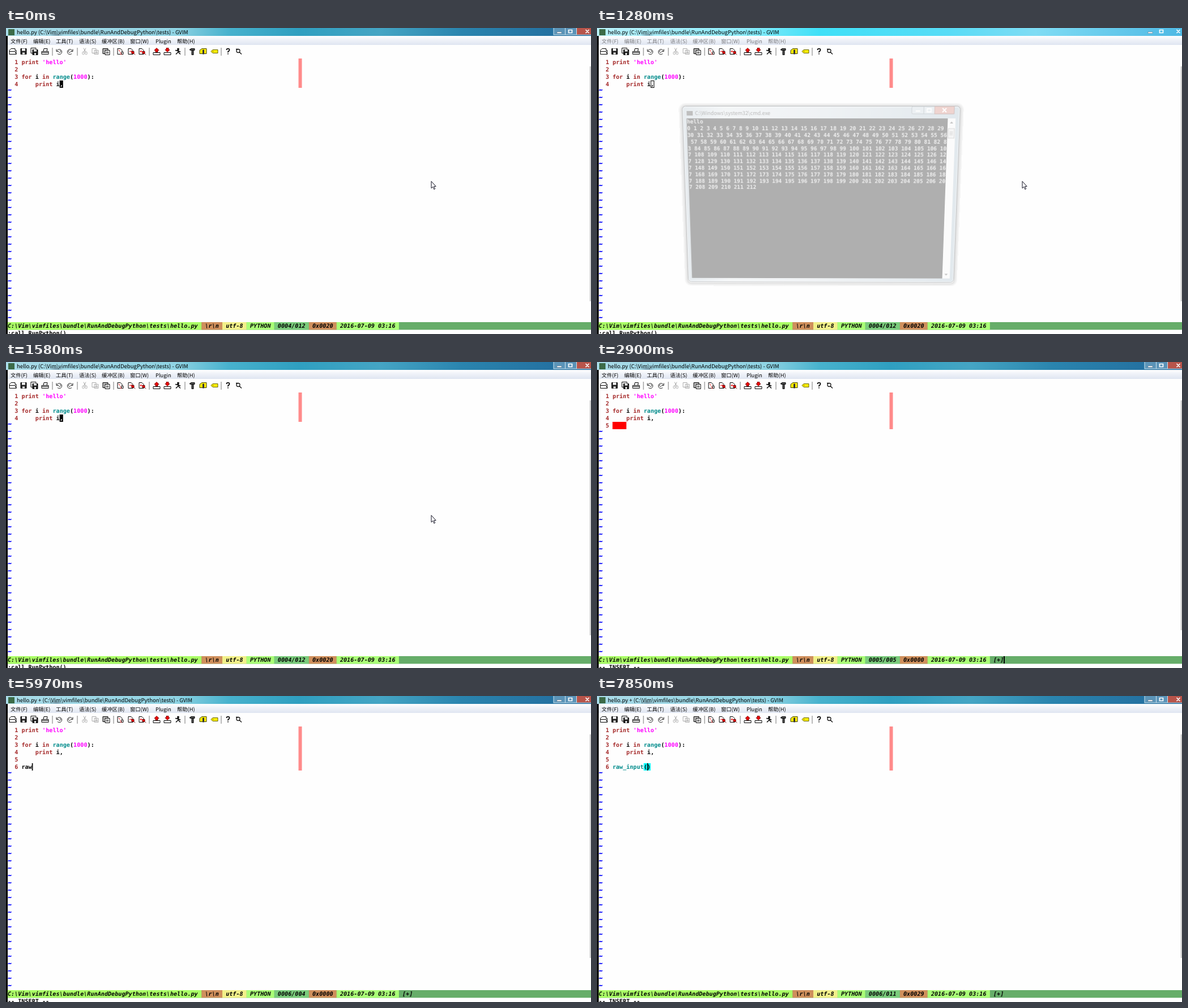
Animation, 1033 px wide and 542 px high, one loop 8 s. Source, as an HTML page:

```html
<!DOCTYPE html>
<html lang="zh">
<head>
<meta charset="utf-8">
<title>hello.py - GVIM</title>
<style>
  html, body { margin: 0; width: 100%; height: 100%; overflow: hidden; background: #fff; }
  #stage { position: relative; width: 1033px; height: 542px; overflow: hidden; }
  svg { position: absolute; left: 0; top: 0; overflow: visible; }
  text { white-space: pre; text-rendering: geometricPrecision; }
  .ui { font: 9.3px "Noto Sans CJK SC", "Noto Sans CJK", "Noto Sans", sans-serif; }
  .title { font-size: 9.6px; }
  .code { font: bold 10.156px "DejaVu Sans Mono", monospace; }
  .tilde { stroke: #00f; stroke-width: .6px; }
  .status { font-style: italic; }
  .con { font: bold 9.75px "DejaVu Sans Mono", monospace; }
  #cmd { transform-origin: 0 0; }
</style>
</head>
<body>
<div id="stage">
  <svg id="chrome" width="1033" height="542"></svg>
  <svg id="editor" width="1033" height="542"></svg>
  <svg id="cmd" width="500" height="325"></svg>
  <svg id="pointer" width="1033" height="542">
    <path d="M751 271.5v12.3l2.8-2.6 2 4.6 1.900-.9-2-4.300h3.500z" fill="#fff" stroke="#112" stroke-width="1"/>
  </svg>
</div>
<script>
const LOOP = 8000, CW = 6.114, RH = 13, X0 = 2.95, Y0 = 54;
const BROWN = '#a52a2a', TEAL = '#008b8b', PINK = '#f0f';
const $ = id => document.getElementById(id);
const colX = c => X0 + c * CW;
const rowY = r => Y0 + r * RH;

const rect = (x, y, w, h, fill, more = '') =>
  `<rect x="${x}" y="${y}" width="${w}" height="${h}" fill="${fill}" ${more}/>`;
const text = (x, y, s, cls, fill = '#000') =>
  `<text x="${x}" y="${y}" class="${cls}" fill="${fill}">${s}</text>`;
const code = (c, r, s, fill) => text(colX(c), rowY(r) + 10, s, 'code', fill);
const cells = (c, r, n, fill) => rect(colX(c), rowY(r), n * CW, RH, fill);

// Each step changes part of the state at the given time.
const STEPS = [
  [0, { cursor: 'block', at: [15, 3], rows: 4, typed: '', teal: false, popup: false, red: false,
        cmdline: ':call RunPython()', mod: false, plus: false, pos: '0004/012', hex: '0x0020',
        mouse: true, cmd: null, bar: 484, stray: false }],
  [150, { cursor: '' }],
  [450, { cursor: 'block' }],
  [850, { cursor: '' }],
  [980, { cursor: 'block' }],
  [1280, { cursor: 'box', cmd: 'open' }],
  [1440, { cursor: 'block', cmd: 'close' }],
  [1580, { cmd: null }],
  [2160, { cursor: '' }],
  [2310, { mouse: false }],
  [2440, { cursor: 'block' }],
  [2900, { cursor: '', rows: 5, red: true, cmdline: '-- INSERT --', mod: true, stray: true,
           pos: '0005/005', hex: '0x0000', bar: 475 }],
  [3180, { cursor: 'bar', at: [8, 4], plus: true, stray: false }],
  [3710, { at: [4, 4], red: false, pos: '0005/001' }],
  [4320, { cursor: '' }],
  [4600, { cursor: 'bar', at: [4, 5], rows: 6, pos: '0006/001' }],
  [4750, { bar: 464 }],
  [5430, { cursor: '' }],
  [5700, { cursor: 'bar', ...type('r') }],
  [5820, type('ra')],
  [5970, type('raw')],
  [6090, { popup: true, cmdline: '-- User defined completion (^U^N^P) ' }],
  [6520, type('raw_')],
  [6680, type('raw_i')],
  [6820, type('raw_in')],
  [7110, type('raw_inp')],
  [7260, { ...type('raw_input'), teal: true }],
  [7850, { ...type('raw_input()'), at: [14, 5], popup: false, cmdline: '-- INSERT --',
           pos: '0006/011', hex: '0x0029' }],
];

function type(s) {
  return { typed: s, at: [4 + s.length, 5], pos: '0006/' + String(s.length + 1).padStart(3, '0') };
}

const MENU = [[8, '文件(F)'], [48, '编辑(E)'], [88, '工具(T)'], [129, '语法(S)'],
  [169, '缓冲区(B)'], [219, '窗口(W)'], [264, 'Plugin'], [302, '帮助(H)']];

// Toolbar icons: centre x, then [path, fill, stroke] parts.
const DISK = 'M-5-5H5V5H-5z', PAGE = 'M-5-5H0L3-2V5H-5z', GREY = '#aaa', RED = '#e00';
const SHEET = [PAGE, '#fff', '#000'], LENS = ['M1 0h4v4H1zM5 4l2 2', RED, '#600'];
const TRAY = ['M-6 2H6V6H-6z', '#fff', '#000'];
const ICONS = [
  [12, ['M-6 5V-2L-3-5H4V-2H6V5zM-6 0H4L6 5', '#fff', '#000']],
  [31, [DISK, '#222', '#000'], ['M-3-5H3V-1H-3zM-2 2H2V5H-2z', '#fff', 'none']],
  [50, ['M-6-6H3V3H-6z', '#fff', '#000'], ['M-3-3H6V6H-3z', '#222', '#000'], ['M-1-3H4V0H-1zM0 3H3V6H0z', '#fff', 'none']],
  [69, ['M-3 0L-2-5H4L3 0M-6 0H6V5H-6zM-6 2H6', '#fff', '#000']],
  [94, ['M-5-4V0H-1M-4-1A4.5 4.5 0 1 1-3 4M-1 1A2 2 0 1 0 1-2', 'none', '#222']],
  [113, ['M5-4V0H1M4-1A4.5 4.5 0 1 0 3 4M1 1A2 2 0 1 1-1-2', 'none', '#222']],
  [139, ['M-2-6L2 2M2-6L-2 2M-4 3a1.7 1.7 0 1 0 3 0a1.7 1.7 0 1 0-3 0M1 3a1.7 1.7 0 1 0 3 0a1.7 1.7 0 1 0-3 0', 'none', GREY]],
  [158, ['M-6-5H1V3H-6zM-2-2H5V5H-2zM0 1H4M0 3H4', '#fff', GREY]],
  [177, ['M-6-5H3V4H-6z', '#bbb', '#000'], ['M-2-2H6V6H-2zM0 1H4M0 3H4', '#fff', '#000']],
  [202, SHEET, ['M-3-3L-1 0M-1 1L3 5M3 1V5H0', 'none', RED], ['M2 1H5V5H2z', '#fff', '#000']],
  [221, SHEET, ['M-3 0H2M0-2L2 0L0 2', 'none', RED], LENS],
  [240, SHEET, ['M-3 0H2M-1-2L-3 0L-1 2', 'none', RED], LENS],
  [266, TRAY, ['M0-6L4-2H2V1H-2V-2H-4z', RED, '#800']],
  [285, TRAY, ['M0 1L4-3H2V-6H-2V-3H-4z', RED, '#800']],
  [304, ['M-1-5h2v2h-2zM0-3V1L4 5M0 1L-4 5M-5-2L0-1L4 1', 'none', '#000', 1.4]],
  [329, ['M-5-3L-2-5H4V-2H-3zM-1-2H2V6H-1z', '#555', '#000']],
  [348, ['M-6-2L-2-5H6V4H-6z', '#fe0', '#440'], ['M-1-3H2V5H-1z', '#333', 'none']],
  [368, ['M-6 0L-3-3H6V3H-3z', '#fe0', '#660'], ['M-3-1h1v2h-1z', '#660', 'none']],
  [392, ['M-2.5-2.5Q-2.5-5 0-5T2.5-2.5Q2.5-1 0 .5V2M0 3.4V5', 'none', '#000', 1.7]],
  [411, ['M-4-1a3 3 0 1 1 6 0a3 3 0 1 1-6 0M1 1L5 5M-5-4H-2', 'none', '#111', 1.3]],
];
const icon = ([x, ...parts]) => `<g transform="translate(${x} 41.5)">` + parts.map(([d, fill, stroke, w = 1]) =>
  `<path d="${d}" fill="${fill}" stroke="${stroke}" stroke-width="${w}"/>`).join('') + '</g>';

const gradient = (id, dir, ...stops) => `<linearGradient id="${id}" ${dir}>` + stops.map(([o, c]) =>
  `<stop offset="${o}" stop-color="${c}"/>`).join('') + '</linearGradient>';
const DOWN = 'x2="0" y2="1"';

function drawChrome(s) {
  const idle = s.cmd === 'open';
  const name = `hello.py ${s.plus ? '+ ' : ''}(C:\\Vim\\vimfiles\\bundle\\RunAndDebugPython\\tests) - GVIM`;
  let out = '<defs>' +
    gradient('hot', '', [0, '#a9dbe8'], [.29, '#8fd3e3'], [.38, '#48b2cd'], [.5, '#2f9fc0'], [.64, '#45a5c4'], [.78, '#2a84ae'], [1, '#226a9c']) +
    gradient('idle', '', [0, '#b8f0fa'], [.25, '#8cebf9'], [.38, '#3fe0f7'], [.6, '#58dcf6'], [.75, '#7fdcf4'], [1, '#4fb9e4']) +
    gradient('menu', DOWN, [0, '#fff'], [.4, '#f0f3f9'], [1, '#dfe5f1']) +
    '<radialGradient id="smear"><stop stop-color="#567" stop-opacity=".6"/><stop offset="1" stop-color="#567" stop-opacity="0"/></radialGradient></defs>';
  out += rect(0, 0, 1033, 542, '#fefefe') + rect(0, 0, 1033, 14, idle ? 'url(#idle)' : 'url(#hot)');
  out += '<ellipse cx="89" cy="12" rx="13" ry="3" fill="url(#smear)"/>';
  out += rect(4, 2, 11, 11, '#3c6b48') + text(19, 10.6, name, 'ui title');
  if (!idle) {
    out += rect(967, -2, 66, 14, '#fff', 'fill-opacity=".25" stroke="#cfe6f0"') + rect(1008, 0, 25, 11.5, '#b8544a');
    out += '<path d="M987.5 0V12M1007.5 0V12" stroke="#cfe6f0"/>';
  }
  out += rect(973, 7, 8, 2.5, '#fff', 'stroke="#567" stroke-width=".5"');
  out += '<path d="M993.5 3.5H999.5V8.5H993.5zM1023.5 3L1029.5 9M1029.5 3L1023.5 9" fill="none" stroke="#fff" stroke-width="1.7"/>';
  out += rect(3, 14, 1030, 16, 'url(#menu)');
  out += MENU.map(([x, t]) => text(x, 27, t, 'ui', idle ? '#7c7c80' : '#000')).join('');
  out += ICONS.map(icon).join('');
  out += [82, 126, 190, 253, 316, 380].map(x => rect(x - .5, 35, 1, 14, '#777')).join('');
  out += rect(1031, 68, 1.2, s.bar - 68, '#aaa') + rect(0, 14, 3, 528, '#000');
  $('chrome').innerHTML = out;
}

function drawStatus(s) {
  const segs = [['C:\\Vim\\vimfiles\\bundle\\RunAndDebugPython\\tests\\hello.py ', '#aaff66'],
    [' \\r\\n ', '#cf8f5c'], [' utf-8 ', '#f2f08a'], [' PYTHON ', '#aaff77'], [` ${s.pos} `, '#7acb7c'],
    [` ${s.hex} `, '#cf8f5c'], [' 2016-07-09 03:16 ', '#aaff77']];
  let col = 0, out = rect(3, 521, 1030, 13.5, '#66ad69'), labels = '';
  for (const [t, fill] of segs) {
    const body = t.trimStart();
    out += rect(colX(col), 521, t.length * CW, 13.5, fill);
    labels += text(colX(col + t.length - body.length), 531, body, 'code status');
    col += t.length;
  }
  if (s.mod) labels += text(colX(114), 531, '[+]', 'code status');
  if (s.stray) labels += rect(718, 521, 2, 13, '#000');
  return out + labels;
}

function drawEditor(s) {
  let out = rect(516.5, Y0, 6, s.rows * RH, '#ff8b8b');
  for (let r = 0; r < 36; r++) {
    out += r < s.rows ? code(2, r, r + 1, BROWN) : text(X0 + .5, rowY(r) + 6.5, '~', 'code tilde', '#00f');
  }
  out += code(4, 0, 'print', BROWN) + code(10, 0, "'hello'", PINK);
  out += code(4, 2, 'for', BROWN) + code(8, 2, 'i') + code(10, 2, 'in', BROWN) + code(13, 2, 'range', TEAL) +
    code(18, 2, '(') + code(19, 2, '1000', PINK) + code(23, 2, '):');
  out += code(8, 3, 'print', BROWN) + code(14, 3, 'i,');
  if (s.red) out += cells(4, 4, 4, '#f00');

  const [word, call] = [s.typed.slice(0, 9), s.typed.slice(9)];
  if (call) out += cells(13, 5, 2, '#0ff') + code(13, 5, call);
  out += code(4, 5, word, s.teal ? TEAL : '#000');
  if (s.popup) out += cells(3, 6, 16, '#ff87ff') + code(4, 6, 'raw_input [S]');

  const [c, r] = s.at;
  if (s.cursor === 'block') out += cells(c, r, 1, '#000') + code(c, r, ',', '#fff');
  if (s.cursor === 'box') out += rect(colX(c) + .5, rowY(r) + .5, 5.5, 12, 'none', 'stroke="#000"');
  if (s.cursor === 'bar') out += rect(colX(c), rowY(r), 1.7, RH, '#000');

  out += drawStatus(s) + text(X0, 544, s.cmdline, 'code');
  if (s.popup) out += text(colX(36), 544, 'Back at original', 'code', '#f00');
  $('editor').innerHTML = out;
}

// Console output wrapped at 80 columns.
function consoleRows(last) {
  const nums = Array.from({ length: last + 1 }, (_, i) => i).join(' ');
  return ['hello', ...nums.match(/.{1,80}/g)];
}

// Corners run clockwise from the top left.
const POSES = {
  open: { last: 212, thumb: 40, alpha: .31, quad: [[150, 138], [642, 138], [630, 451], [161, 450]] },
  close: { last: 999, thumb: 62, alpha: .51, quad: [[148, 143.5], [638, 143.5], [646, 467], [140, 469]] },
};

function project(w, h, [[x0, y0], [x1, y1], [x2, y2], [x3, y3]]) {
  const ax = x1 - x2, bx = x3 - x2, sx = x0 - x1 + x2 - x3;
  const ay = y1 - y2, by = y3 - y2, sy = y0 - y1 + y2 - y3;
  const det = ax * by - bx * ay, g = (sx * by - bx * sy) / det, k = (ax * sy - sx * ay) / det;
  const m = [(x1 - x0 + g * x1) / w, (y1 - y0 + g * y1) / w, 0, g / w,
    (x3 - x0 + k * x3) / h, (y3 - y0 + k * y3) / h, 0, k / h, 0, 0, 1, 0, x0, y0, 0, 1];
  return `matrix3d(${m.map(v => v.toFixed(9))})`;
}

function drawCmd(s) {
  const el = $('cmd'), pose = POSES[s.cmd];
  el.style.display = pose ? '' : 'none';
  if (!pose) return;
  el.style.opacity = pose.alpha;
  el.style.transform = project(500, 325, pose.quad);
  let out = gradient('glass', '', [0, '#b3c3ce'], [.15, '#dde4e9'], [.5, '#cfd8df'], [1, '#a3b9c8']);
  for (const d of [5, 3, 1]) {
    out += rect(-d, 1 - d, 500 + 2 * d, 325 + 2 * d, 'none', `rx="${6 + d}" stroke="#000" stroke-opacity="${.4 - d * .06}" stroke-width="2"`);
  }
  out += rect(.5, .5, 499, 324, 'url(#glass)', 'rx="6" stroke="#33393e"') + rect(1.7, 1.7, 496.6, 321.6, 'none', 'rx="5" stroke="#fff" stroke-opacity=".7"');
  out += rect(8, 9, 11, 8, '#333') + text(23, 15.5, 'C:\\Windows\\system32\\cmd.exe', 'ui', '#222');
  out += rect(413, 1, 76, 13, '#c4d2dc', 'rx="2" stroke="#6c7a84"') + rect(454, 1, 35, 13, '#cf7668', 'stroke="#7a3b33"');
  out += '<path d="M434.5 1V14" stroke="#6c7a84"/><path d="M420 9H428M440.5 5H447.5V10.5H440.5zM468 4L475 11M475 4L468 11" fill="none" stroke="#fff" stroke-width="2"/>';
  out += rect(7.5, 22, 484.5, 295, '#000') + rect(478, 22, 14, 295, '#f4f4f4');
  out += rect(479.5, pose.thumb, 11, 17, '#e2e2e2', 'stroke="#888"') +
    `<path d="M482 ${pose.thumb + 6}h6m-6 2.5h6m-6 2.5h6" stroke="#777"/>`;
  out += '<path d="M482 31l3-3.5 3 3.5zM482 308l3 3.5 3-3.5z" fill="#444"/>';
  out += consoleRows(pose.last).slice(-24).map((t, i) => text(8, 31.3 + i * 11.8, t, 'con', '#d0d0d0')).join('');
  el.innerHTML = out;
}

let shown = -1;
function frame() {
  const t = performance.now() % LOOP;
  const n = STEPS.filter(([at]) => at <= t).length;
  if (n !== shown) {
    shown = n;
    const s = Object.assign({}, ...STEPS.slice(0, n).map(([, change]) => change));
    drawChrome(s);
    drawEditor(s);
    drawCmd(s);
    $('pointer').style.display = s.mouse ? '' : 'none';
  }
  requestAnimationFrame(frame);
}
frame();
</script>
</body>
</html>
```
